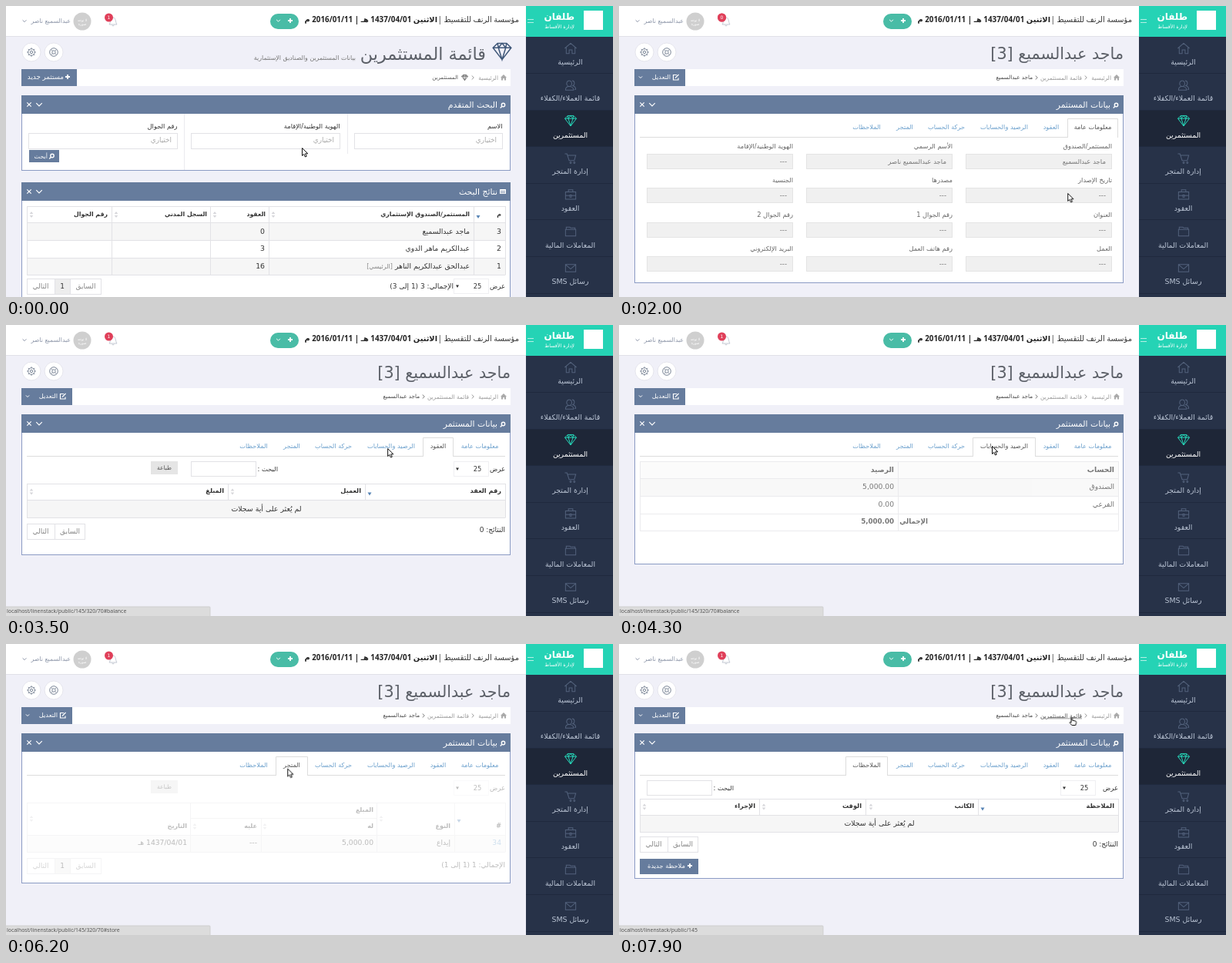
An HTML page for the animation above (8000 ms loop, 788x378 px).

```html
<!DOCTYPE html>
<html lang="ar">
<head>
<meta charset="utf-8">
<title>قائمة المستثمرين</title>
<style>
html, body { margin: 0; width: 100%; height: 100%; overflow: hidden; background: #f0f0f8; }
svg { display: block; width: 788px; height: 378px; }
text { direction: rtl; font-family: "DejaVu Sans", sans-serif; white-space: pre; }
.mid { text-anchor: middle; }
.b { font-weight: bold; }
.head, .url { font-family: "Noto Sans", "DejaVu Sans", sans-serif; }
.url { direction: ltr; }
.u { text-decoration: underline; }
</style>
</head>
<body>
<svg id="stage" viewBox="0 0 788 378"></svg>
<script>
const LOOP = 8000, FADE = 150;
const BLUE = '#667c9d', LINK = '#6a9fcc', INK = '#333', GREY = '#777', LINE = '#e2e2e6';

const person = 'ماجد عبدالسميع', owner = 'عبدالسميع ناصر';
const site = 'localhost/linenstack/public/145';

// x is the right edge of the text, y its middle
const text = (x, y, size, str, fill = INK, cls = '') =>
  `<text x="${x}" y="${y + size * 0.34}" font-size="${size}" fill="${fill}" class="${cls}">${str}</text>`;
const rect = (x, y, x2, y2, fill, stroke = 'none', r = 0) =>
  `<rect x="${x}" y="${y}" width="${x2 - x}" height="${y2 - y}" fill="${fill}" stroke="${stroke}" rx="${r}"/>`;
const frame = (x, y, x2, y2, fill = '#fff', stroke = LINE) =>
  rect(x + .5, y + .5, x2 - .5, y2 - .5, fill, stroke);
const circle = (x, y, r, fill, stroke = 'none') =>
  `<circle cx="${x}" cy="${y}" r="${r}" fill="${fill}" stroke="${stroke}"/>`;
const line = (d, stroke = LINE, w = 1) =>
  `<path d="${d}" fill="none" stroke="${stroke}" stroke-width="${w}"/>`;
const icon = (x, y, d, stroke, w = 1, scale = 1) =>
  `<g transform="translate(${x} ${y}) scale(${scale})">${line(d, stroke, w / scale)}</g>`;
const shape = (x, y, d, fill) => `<path transform="translate(${x} ${y})" d="${d}" fill="${fill}"/>`;
// visible from a to b, with optional fades
const show = (a, b, body, fadeIn = 0, fadeOut = 0) =>
  `<g data-show="${[a, b, fadeIn, fadeOut]}">${body}</g>`;

const GEM = 'M-10-4L-5-9H5L10-4L0 9ZM-10-4H10M-5-9L-4-4L0 9L4-4L5-9M-4-4L0-9L4-4';
const LENS = 'M-1.7-.5A2.2 2.2 0 1 0 2.7-.5A2.2 2.2 0 1 0-1.7-.5M-1 1.3L-3.3 3.6';
const CHEVRON = 'M-3-1.5L0 1.5L3-1.5';
const PLUS = 'M-3 0H3M0-3V3';
const CROSS = 'M-2.7-2.7L2.7 2.7M2.7-2.7L-2.7 2.7';
const HOUSE = 'M-4 0L0-4L4 0H3V3.5H1V1H-1V3.5H-3V0Z';

const sort = (x, y, on) => on
  ? shape(x, y, 'M-2.5 0H2.5L0 4Z', '#5784b5')
  : shape(x, y, 'M-2.3-1L0-4L2.3-1ZM-2.3 1L0 4L2.3 1Z', '#d6d6da');

function table(ys, cols, shaded = []) {
  const last = ys[ys.length - 1];
  return shaded.map(i => rect(27, ys[i], 648, ys[i + 1], '#f6f6f6')).join('') +
    line(ys.map(y => `M27 ${y + .5}H648.5`).join('') +
      [27, ...cols, 648].map(x => `M${x + .5} ${ys[0]}V${last}`).join(''));
}
const row = (y, rights, words, size, fill, cls) =>
  words.map((w, i) => text(rights[i], y, size, w, fill, cls)).join('');

function pager(y, numbered) {
  const left = numbered ? 83 : 63, right = left + 41 - (numbered ? 0 : 1);
  return frame(27, y, right, y + 21) + (numbered ? frame(63, y, 84, y + 21, '#ededed') + text(73, y + 10, 9, '1', INK, 'mid') : '') +
    line(`M${left + .5} ${y}v21`) +
    text(45, y + 10, 9, 'التالي', '#888', 'mid') + text((left + right) / 2, y + 10, 9, 'السابق', '#888', 'mid');
}
const lengthMenu = (x, y) => text(648, y, 8.5, 'عرض') +
  frame(x, y - 10, x + 46, y + 10, '#fff', '#efeff2') +
  text(x + 31, y + .5, 8.3, '25', INK, 'mid') + shape(x + 5, y - 1.5, 'M-2 0H2L0 3.5Z', INK);
const printButton = rect(188, 177, 223, 194, '#e5e5e5') + text(205.5, 185, 7.5, 'طباعة', '#555', 'mid');
const search = x => frame(x, 177, x + 85, 197) + text(x + 113, 187, 8.4, 'البحث :');
const noRecords = y => text(338, y, 9.4, 'لم يُعثر على أية سجلات', INK, 'mid');

const panelHead = (y, title) => rect(20, y, 655, y + 24, BLUE) +
  text(638, y + 12, 10.8, title, '#fff') +
  icon(30, y + 12, CROSS, '#fff', 1.2) + icon(43, y + 12, CHEVRON, '#fff', 1.2, 1.25);
const panelBody = (y, y2) => frame(20, y, 655, y2, '#fff', '#8b9bc4');

function sidebar() {
  const items = [
    ['الرئيسية', 'M-8 0L0-7L8 0M-6-1V7H-2V2H2V7H6V-1'],
    ['قائمة العملاء/الكفلاء', 'M-2-6A3.5 4 0 1 0-1.9-6M-7 7C-7 3-4 2-2 2S4 3 4 7ZM2-6C6-6 6 0 3 1C6 2 7 4 7 6H5'],
    ['المستثمرين', GEM],
    ['إدارة المتجر', 'M-8-6H-5L-2 3H5L7-4H-4.5M-1 6A1 1 0 1 0-1 5.9M4 6A1 1 0 1 0 4 5.9'],
    ['العقود', 'M-7-4H7V6H-7ZM-3-4V-7H3V-4M-7 1H-1M1 1H7M-1 0H1V3H-1Z'],
    ['المعاملات المالية', 'M-7-3H7V6H-7ZM-6-3V-6H-1L0-5H6V-3'],
    ['رسائل SMS', 'M-7-5H7V5H-7ZM-7-5L0 1L7-5'],
  ];
  return rect(675, 0, 788, 378, '#273248') + rect(675, 135, 788, 183, '#1e2637') +
    items.map(([name, d], i) => {
      const y = 55 + i * 47.6, on = i === 2;
      return icon(733, y - (on ? 1 : 0), d, on ? '#26d6b8' : '#53627c', 1, on ? .75 : .95) +
        text(732.5, y + 17.5, 9.4, name, on ? '#fff' : '#bac4d4', 'mid') +
        line(`M675 ${Math.round(y + 32) + .5}H788`, '#1f293d');
    }).join('') +
    rect(675, 0, 788, 40, '#25d3b5') + line('M677 17.5h8M677 21.5h8', '#b5f0e5') +
    rect(750, 6, 775, 31, '#fff') +
    text(738, 14, 12, 'طلفان', '#fff', 'b') + text(738, 27, 6.4, 'لإدارة الأقساط', '#fff');
}

function topBar() {
  const badge = n => circle(133.5, 15, 5.5, '#e0405a') + text(133.5, 15, 6, n, '#fff', 'mid');
  return rect(0, 0, 675, 39, '#fff') + line('M0 39.5H675', '#e0e0e8') +
    text(666, 18, 9.9, 'مؤسسة الرنف للتقسيط |', INK, 'head') +
    text(560, 18, 9.8, 'الاثنين 1437/04/01 هـ | 2016/01/11 م', '#222', 'b head') +
    rect(343, 10, 380, 30, '#49bca6', 'none', 10) +
    icon(369, 19, PLUS, '#fff', 1.8) + icon(353.5, 19, CHEVRON, '#fff', 1, .8) +
    icon(139, 20, 'M-5 4C-3 2-4-5 0-5S3 2 5 4ZM-1.5 5Q0 7 1.5 5', '#c3c8d2') +
    badge(1) + show(1800, 3300, badge(0)) +
    circle(99, 20, 11.5, '#cfcfcf') + text(99, 18, 4.5, 'لا توجد', '#fff', 'mid') + text(99, 23, 4.5, 'صورة', '#fff', 'mid') +
    text(84, 19.5, 7.8, owner, '#8c95a8') + icon(24, 19.5, CHEVRON, '#8c95a8', 1, .8);
}

function pageTools() {
  const spokes = [...Array(8)].map((_, i) => {
    const a = i * Math.PI / 4, c = Math.cos(a), s = Math.sin(a);
    return `M${c * 4} ${s * 4}L${c * 5.8} ${s * 5.8}`;
  }).join('');
  const ring = r => `M${-r} 0A${r} ${r} 0 1 0 ${r} 0A${r} ${r} 0 1 0 ${-r} 0`;
  return [33, 62].map(x => circle(x, 60, 12, '#fff', '#e4e4ec')).join('') +
    icon(33, 60, ring(4.2) + ring(1.7) + spokes, '#7c8798') +
    icon(62, 60, ring(5.3) + ring(2.2) + 'M-3.8-3.8L-1.6-1.6M3.8-3.8L1.6-1.6M-3.8 3.8L-1.6 1.6M3.8 3.8L1.6 1.6', '#7c8798') +
    rect(20, 82, 655, 104, '#fff') + shape(646, 93, HOUSE, '#aaa') +
    text(639, 93, 7.5, 'الرئيسية', '#999') + icon(606, 93, 'M-1.3-2.5L1.3 0L-1.3 2.5', '#999');
}

function listPage() {
  const fields = [['الاسم', 452, 645], ['الهوية الوطنية/الإقامة', 240, 434], ['رقم الجوال', 29, 223]];
  const rights = [643, 602, 336];
  const first = cls => text(602, 293, 9.3, person, INK, cls);
  return icon(644, 59, GEM, '#3f5778', 1.5, 1.18) +
    text(623, 62, 22.3, 'قائمة المستثمرين', '#5c6068') +
    text(454, 67, 7.9, 'بيانات المستثمرين والصناديق الإستثمارية', GREY) +
    icon(595.5, 93, GEM, '#666', .8, .4) + text(587, 93, 7, 'المستثمرين', '#555') +
    rect(20, 82, 92, 104, BLUE) + icon(80, 92, PLUS, '#fff', 1.8) + text(75, 92.5, 8.7, 'مستثمر جديد', '#fff') +
    panelBody(139, 214) + panelHead(116, 'البحث المتقدم') + icon(645, 129, LENS, '#fff', 1.4) +
    line('M443.5 140V192M231.5 140V213', '#ebebef') +
    fields.map(([name, x, x2]) => text(x2 - .5, 156, 8.3, name) + frame(x, 165, x2, 186) +
      text(x2 - 8, 173.5, 8.9, 'اختياري', '#aaa')).join('') +
    rect(30, 187, 69, 203, BLUE) + icon(59.5, 195, LENS, '#fff', 1.4) + text(54, 195, 8, 'أبحث', '#fff') +
    panelBody(252, 390) + panelHead(229, 'نتائج البحث') +
    rect(641, 238, 649, 244, '#fff') + line('M642 240.5h6M642 242.5h6', BLUE, .8) +
    table([260, 281, 304, 327, 349], [607, 341, 265, 137], [1, 3]) +
    row(270, [643, 602, 337, 261, 132], ['م', 'المستثمر/الصندوق الإستثماري', 'العقود', 'السجل المدني', 'رقم الجوال'], 7.8, INK, 'b') +
    sort(613, 272, true) + [347, 271, 143, 33].map(x => sort(x, 271)).join('') +
    row(293, rights, ['3', '', '0'], 9.3) + first() + show(1000, 1800, first('u')) +
    row(315, rights, ['2', 'عبدالكريم ماهر الدوي', '3'], 9.3) +
    row(338, rights, ['1', 'عبدالحق عبدالكريم الناهر <tspan fill="#888" font-size="8">[الرئيسي]</tspan>', '16'], 9.3) +
    lengthMenu(581, 364) + text(581, 364, 9, 'الإجمالي: 3 (1 إلى 3)') + pager(354, true);
}

function infoTab() {
  const names = [
    ['المستثمر/الصندوق', 'الأسم الرسمي', 'الهوية الوطنية/الإقامة'],
    ['تاريخ الإصدار', 'مصدرها', 'الجنسية'],
    ['العنوان', 'رقم الجوال 1', 'رقم الجوال 2'],
    ['العمل', 'رقم هاتف العمل', 'البريد الإلكتروني'],
  ];
  const values = [person, person + ' ناصر'];
  return names.map((r, j) => r.map((name, i) => {
    const right = 640 - i * 207, y = Math.round(192 + j * 44.4);
    return text(right, y - 10, 8.3, name, '#666') + frame(right - 190, y, right, y + 20, '#f0f0f0', '#e4e4e4') +
      text(right - 8, y + 10, 8.5, (j === 0 && values[i]) || '---', GREY);
  }).join('')).join('');
}

function emptyTable(ys, cols, heads, marks) {
  const y = (ys[0] + ys[1]) / 2;
  return table(ys, cols, [1]) + row(y - 1, [643, ...cols.map(c => c - 5)], heads, 8.2, INK, 'b') +
    marks.map((x, i) => sort(x, y + (i ? 0 : 1), !i)).join('') +
    rect(28, ys[1] + 1, 648, ys[2], '#f6f6f6') +
    noRecords((ys[1] + ys[2]) / 2) + text(648, ys[2] + 16, 9, 'النتائج: 0');
}

const contractsTab = () => lengthMenu(581, 187) + search(240) + printButton +
  emptyTable([206, 227, 250], [466, 288], ['رقم العقد', 'العميل', 'المبلغ'], [472, 294, 33]) + pager(258);

const balanceTab = () => table([177, 199, 222, 245, 267], [362], [1]) +
  rect(28, 178, 362, 199, '#fafafa') + rect(363, 178, 648, 199, '#fafafa') +
  row(188, [643, 357], ['الحساب', 'الرصيد'], 9.2, INK, 'b') +
  row(210, [643, 357], ['الصندوق', '5,000.00'], 9.2) +
  row(233, [643, 357], ['الفرعي', '0.00'], 9.2) +
  row(255, [401, 357], ['الإجمالي', '5,000.00'], 8.7, INK, 'b');

const movesTab = () => lengthMenu(581, 187) + printButton +
  table([206, 248, 270], [582, 481, 331, 239], [1]) +
  rect(330, 207, 333, 226, '#fff') + line('M239.5 226.5H481') +
  text(477, 215, 8, 'المبلغ', INK, 'b') +
  row(236, [643, 577, 477, 326, 235], ['#', 'النوع', 'له', 'عليه', 'التاريخ'], 8, INK, 'b') +
  sort(588, 228, true) + sort(487, 227) + sort(336, 237) + sort(245, 237) + sort(33, 227) +
  row(258, [643, 577, 477, 326, 235], [`<tspan fill="${LINK}">34</tspan>`, 'إيداع', '5,000.00', '---', '1437/04/01 هـ'], 9.2) +
  text(648, 287, 9, 'الإجمالي: 1 (1 إلى 1)') + pager(278, true);

const shopTab = () => lengthMenu(581, 187) + search(240) + printButton +
  emptyTable([206, 227, 250], [466, 288], ['السلعة', 'الكمية', 'سعر الشراء'], [472, 294, 33]) + pager(258);

const notesTab = () => lengthMenu(573, 187) + search(36) +
  emptyTable([201, 222, 244], [466, 320, 182], ['الملاحظة', 'الكاتب', 'الوقت', 'الإجراء'], [472, 327, 188, 33]) + pager(250) +
  rect(27, 279, 103, 299, BLUE) + icon(92, 288, PLUS, '#fff', 1.8) + text(86, 288.5, 8.3, 'ملاحظة جديدة', '#fff');

function detailPage() {
  // name, left, right, click time, panel bottom, content
  const tabs = [
    ['معلومات عامة', 582, 648, 1800, 360, infoTab],
    ['العقود', 541, 581, 2870, 299, contractsTab],
    ['الرصيد والحسابات', 459, 541, 4050, 311, balanceTab],
    ['حركة الحساب', 392, 458, 5050, 311, movesTab],
    ['المتجر', 350, 392, 6100, 299, shopTab],
    ['الملاحظات', 294, 349, 6780, 305, notesTab],
  ];
  const label = ([name, l, r], fill) => text((l + r) / 2, 157, 8.2, name, fill, 'mid');
  const spans = tabs.map((t, i) => {
    const first = i === 0, last = i === tabs.length - 1;
    const end = last ? LOOP : tabs[i + 1][3];
    return { t, end, on: t[3] + (first ? 0 : FADE), off: last ? LOOP : end + FADE, fadeIn: first ? 0 : FADE, fadeOut: last ? 0 : FADE };
  });
  const crumb = (fill, cls) => text(601, 93, 7.4, 'قائمة المستثمرين', fill, cls);
  return text(655, 62, 20.7, person + ' [3]', '#5c6068') +
    crumb('#999') + show(7800, LOOP, crumb('#777', 'u')) +
    icon(542, 93, 'M-1.3-2.5L1.3 0L-1.3 2.5', '#777') + text(537, 93, 7.2, person, '#444') +
    rect(20, 82, 86, 104, BLUE) + text(67, 92.5, 8.3, 'التعديل', '#fff') + icon(28, 92.5, CHEVRON, '#fff', 1, .7) +
    icon(74, 92.5, 'M1-3H-3.5V3.5H3V1M-1 1L3.5-3.5', '#fff', 1.2) +
    spans.map(s => show(s.on, s.off, panelBody(139, s.t[4]))).join('') +
    panelHead(116, 'بيانات المستثمر') + icon(645, 129, LENS, '#fff', 1.4) +
    line('M27 170.5H648', '#ddd') + tabs.map(t => label(t, LINK)).join('') +
    spans.map(s => show(s.t[3], s.end,
      rect(s.t[1], 146, s.t[2], 172, '#fff') +
      line(`M${s.t[1] + .5} 171V146.5H${s.t[2] - .5}V171`, '#ddd') + label(s.t, '#555'))).join('') +
    spans.map(s => show(s.on, s.off, s.t[5](), s.fadeIn, s.fadeOut)).join('');
}

function statusBar() {
  const item = site + '/320/70';
  return [
    [1000, 1800, item], [2300, 3500, item + '#sales'], [3500, 4650, item + '#balance'],
    [4650, 5750, item + '#oper'], [5750, 6550, item + '#store'], [6550, 7000, item + '#TheNotes'],
    [7800, LOOP, site],
  ].map(([a, b, url]) => show(a, b, rect(-1, 366, 265, 379, '#dcdcdc', '#cfcfcf', 1) +
    text(1, 372, 6.9, url, '#555', 'url'))).join('');
}

function pointer() {
  const arrow = '<path d="M.5.5V10.5L2.8 8.4L4.4 12L6.2 11.2L4.6 7.8H7.8Z" fill="#fff" stroke="#111"/>';
  const hand = '<path d="M2.5 6V1.2Q3.3 0 4 1.2V4.2L8.6 5.2Q9.4 6 9 8L8.2 10.5H3.4L.6 7.2Q.6 5.6 2.5 7Z" fill="#fff" stroke="#111"/>';
  return '<g id="pointer">' + show(0, 6850, arrow) + show(6850, 7050, hand) +
    show(7050, 7800, arrow) + show(7800, LOOP, hand) + '</g>';
}

const stage = document.getElementById('stage');
stage.innerHTML = rect(0, 0, 788, 378, '#f0f0f8') + topBar() + sidebar() + pageTools() +
  show(0, 1800, listPage()) + show(1800, LOOP, detailPage()) + statusBar() + pointer();

const timing = { duration: LOOP, iterations: Infinity };
const at = (t, props) => ({ offset: t / LOOP, ...props });

for (const el of stage.querySelectorAll('[data-show]')) {
  const [a, b, fadeIn, fadeOut] = el.dataset.show.split(',').map(Number);
  const keys = [[a + fadeIn, 1], [b - fadeOut, 1]];
  if (a > 0) keys.unshift([0, 0], [a, 0]);
  if (b < LOOP) keys.push([b, 0], [LOOP, 0]);
  el.animate(keys.map(([t, opacity]) => at(t, { opacity })), timing);
}

const path = [
  [0, 384, 184], [100, 384, 184], [900, 588, 286], [1400, 590, 293], [1700, 590, 293],
  [2400, 569.5, 161.5], [2900, 569.5, 161.5], [3600, 492, 160], [4100, 492, 160], [4300, 484, 157],
  [4700, 428, 163], [5000, 428, 163], [5400, 419, 162], [5800, 376, 162], [6000, 376, 162],
  [6600, 330, 160], [6800, 330, 160], [6900, 353, 157], [7600, 578, 104], [7750, 578, 104],
  [7850, 584.5, 95], [LOOP, 584.5, 95],
];
document.getElementById('pointer').animate(
  path.map(([t, x, y]) => at(t, { transform: `translate(${x}px, ${y}px)`, easing: 'ease-in-out' })), timing);
</script>
</body>
</html>
```
